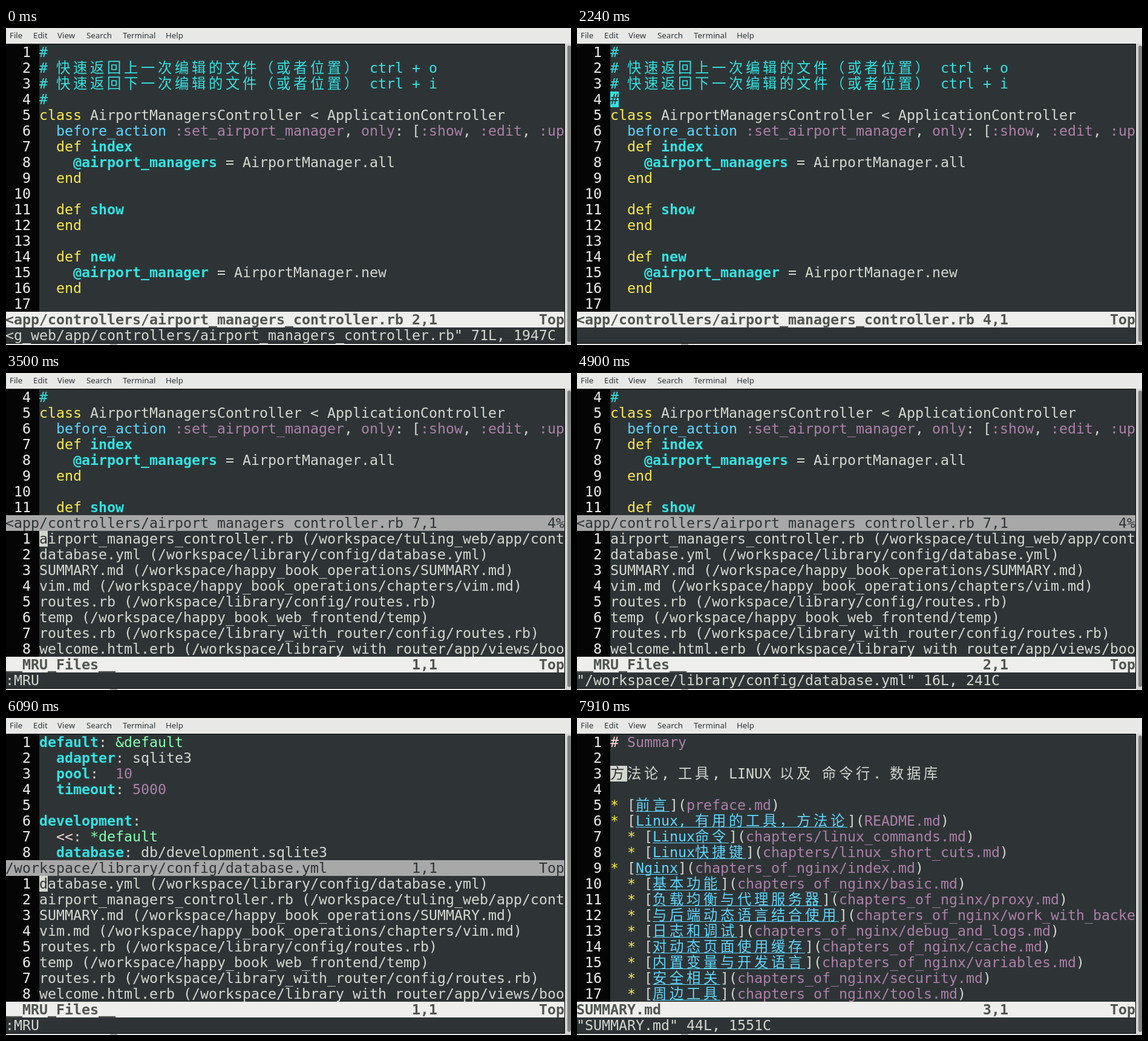
Animation of 934 by 524 pixels, one loop 8000 ms. Source, as an HTML page with a canvas:

```html
<!DOCTYPE html>
<html lang="zh">
<head>
<meta charset="utf-8">
<title>Terminal</title>
<style>
  html, body { margin: 0; width: 100%; height: 100%; overflow: hidden; background: #2e3436; }
  canvas { display: block; }
</style>
</head>
<body>
<canvas id="stage" width="934" height="524"></canvas>
<script>
const ctx = document.getElementById('stage').getContext('2d');
const LOOP = 8000, CELL = 14, ROW = 26, LEFT = -1, TOP = 27, COLS = 66, GUTTER = 4;
const MONO = '23.3px "DejaVu Sans Mono", "Noto Sans CJK SC", "Noto Sans CJK", monospace';
const BG = '#2e3436', FG = '#d3d7cf', NUM = '#eeeeec';

// "~x" switches style: capitals are bold, "u" is underlined
const STYLES = {
  w: { color: FG },
  c: { color: '#34e2e2' },
  C: { color: '#34e2e2', bold: true },
  y: { color: '#fce94f' },
  b: { color: '#5fd7ff' },
  u: { color: '#5fd7ff', line: true },
  p: { color: '#ad7fa8' },
  g: { color: '#87ffaf' },
  k: { color: '#ffd7d7' }
};

const ruby = [
  '~c#',
  '~c# 快速返回上一次编辑的文件（或者位置） ctrl + o',
  '~c# 快速返回下一次编辑的文件（或者位置） ctrl + i',
  '~c#',
  '~yclass ~wAirportManagersController < ApplicationController',
  '  ~bbefore_action ~p:set_airport_manager~w, ~ponly~w: [~p:show~w, ~p:edit~w, ~p:up',
  '  ~ydef ~Cindex',
  '    ~C@airport_managers~w = AirportManager.all',
  '  ~yend',
  '',
  '  ~ydef ~Cshow',
  '  ~yend',
  '',
  '  ~ydef ~Cnew',
  '    ~C@airport_manager~w = AirportManager.new',
  '  ~yend',
  ''
];

const dbEntry = name => [
  `~C${name}~w:`, '  ~k<<~w: ~g*default', `  ~Cdatabase~w: db/${name}.sqlite3`
];
const yaml = [
  '~Cdefault~w: ~g&default',
  '  ~Cadapter~w: sqlite3',
  '  ~Cpool~w:  ~p10',
  '  ~Ctimeout~w: ~p5000',
  '', ...dbEntry('development'),
  '', ...dbEntry('test'),
  '', ...dbEntry('production')
];

const link = (label, url) => `~y* ~w[~u${label}~w](~p${url}.md~w)`;
const sub = (label, url) => '  ' + link(label, url);
const nginx = (label, page) => sub(label, 'chapters_of_nginx/' + page);
const summary = [
  '~k# ~pSummary',
  '',
  '方法论, 工具, LINUX 以及 命令行. 数据库',
  '',
  link('前言', 'preface'),
  link('Linux, 有用的工具，方法论', 'README'),
  sub('Linux命令', 'chapters/linux_commands'),
  sub('Linux快捷键', 'chapters/linux_short_cuts'),
  link('Nginx', 'chapters_of_nginx/index'),
  nginx('基本功能', 'basic'),
  nginx('负载均衡与代理服务器', 'proxy'),
  nginx('与后端动态语言结合使用', 'work_with_backend'),
  nginx('日志和调试', 'debug_and_logs'),
  nginx('对动态页面使用缓存', 'cache'),
  nginx('内置变量与开发语言', 'variables'),
  nginx('安全相关', 'security'),
  nginx('周边工具', 'tools')
];

const controller = 'airport_managers_controller.rb (/workspace/tuling_web/app/controllers/airport_managers_controller.rb)';
const database = 'database.yml (/workspace/library/config/database.yml)';
const recent = (...latest) => [
  ...latest,
  'SUMMARY.md (/workspace/happy_book_operations/SUMMARY.md)',
  'vim.md (/workspace/happy_book_operations/chapters/vim.md)',
  'routes.rb (/workspace/library/config/routes.rb)',
  'temp (/workspace/happy_book_web_frontend/temp)',
  'routes.rb (/workspace/library_with_router/config/routes.rb)',
  'welcome.html.erb (/workspace/library_with_router/app/views/books/welcome.html.erb)'
];

const pane = (lines, name, end, rows = 17, first = 1, pos) => ({ lines, name, end, rows, first, pos });
const rubyName = '<app/controllers/airport_managers_controller.rb';
const yamlName = '/workspace/library/config/database.yml';
const mru = (...latest) => pane(recent(...latest), '__MRU_Files__', 'Top', 8);

const screens = {
  ruby: [pane(ruby, rubyName, 'Top')],
  rubySplit: [pane(ruby, rubyName, '4%', 8, 4, '7,1'), mru(controller, database)],
  yaml: [pane(yaml, yamlName, 'All')],
  yamlSplit: [pane(yaml, yamlName, 'Top', 8, 1, '1,1'), mru(database, controller)],
  summary: [pane(summary, 'SUMMARY.md', 'Top')]
};

// Each step changes part of the state; "line" is the cursor line of the last pane
const steps = [
  { t: 0, screen: 'ruby', line: 2, blink: false, visual: 0,
    cmd: '<g_web/app/controllers/airport_managers_controller.rb" 71L, 1947C' },
  { t: 350, blink: true },
  { t: 490, visual: 2, cmd: '-- VISUAL LINE --' },
  { t: 1260, blink: false },
  { t: 1610, line: 3, blink: true },
  { t: 2240, line: 4, visual: 0, cmd: '' },
  { t: 2380, line: 5 },
  { t: 2590, line: 6 },
  { t: 2800, line: 7 },
  { t: 3430, blink: false, cmd: ':MRU' },
  { t: 3500, screen: 'rubySplit', line: 1, blink: true },
  { t: 4270, blink: false },
  { t: 4480, line: 2, blink: true },
  { t: 4900, blink: false, cmd: `"${yamlName}" 16L, 241C` },
  { t: 5040, screen: 'yaml', line: 1, blink: true },
  { t: 5810, blink: false },
  { t: 5950, blink: true },
  { t: 6090, screen: 'yamlSplit', cmd: ':MRU' },
  { t: 6510, line: 2 },
  { t: 6720, line: 3 },
  { t: 7350, blink: false, cmd: '"SUMMARY.md" 44L, 1551C' },
  { t: 7420, screen: 'summary', line: 1, blink: true },
  { t: 7700, line: 2 },
  { t: 7910, line: 3 }
];

const rect = (color, x, y, w, h) => { ctx.fillStyle = color; ctx.fillRect(x, y, w, h); };
const colX = col => LEFT + col * CELL;
const rowY = row => TOP + row * ROW;
const cells = ch => /[\u2e80-\uffef]/.test(ch) ? 2 : 1;

// Splits marked-up text into placed, styled characters
function layout(text, col) {
  let style = STYLES.w;
  const out = [];
  for (let i = 0; i < text.length; i++) {
    if (text[i] === '~') { style = STYLES[text[++i]]; continue; }
    const width = cells(text[i]);
    if (col + width > COLS) break;
    out.push({ ch: text[i], col, width, style });
    col += width;
  }
  return out;
}

function glyph(ch, col, row, color, bold) {
  ctx.font = (bold ? 'bold ' : '') + MONO;
  ctx.fillStyle = color;
  ctx.fillText(ch, colX(col), rowY(row) + 21);
}

function plain(text, col, row, color, bold) {
  for (const c of layout(text, col)) glyph(c.ch, c.col, row, color, bold);
}

function codeRow(row, number, text, cursor, selected) {
  const y = rowY(row), chars = layout(text, GUTTER);
  rect('#050505', 0, y, 55, ROW);
  plain(String(number).padStart(3), 0, row, NUM);
  if (selected) {
    const last = chars[chars.length - 1];
    rect('#626262', 55, y, (last.col + last.width + 1 - GUTTER) * CELL, ROW);
  }
  if (cursor) {
    const c = chars[0];
    const color = c && c.ch !== ' ' ? c.style.color : FG;
    rect(color, 55, y, CELL * (c ? c.width : 1), ROW);
  }
  chars.forEach((c, i) => {
    const color = cursor && i === 0 ? BG : c.style.color;
    if (c.style.line) rect(color, colX(c.col), y + 23, c.width * CELL, 1);
    glyph(c.ch, c.col, row, color, c.style.bold);
  });
}

function statusRow(row, p, pos, active) {
  const color = active ? '#50544f' : BG;
  rect(active ? '#eeeeec' : '#a8a8a8', 0, rowY(row), 923, ROW);
  plain(p.name, 0, row, color, active);
  plain(pos, 48, row, color, active);
  plain(p.end, COLS - p.end.length, row, color, active);
}

function frame() {
  rect('#e8e8e7', 0, 0, 934, 524);
  ctx.font = '13.3px "Noto Sans", "Open Sans", sans-serif';
  ctx.fillStyle = '#2e3436';
  [['File', 6], ['Edit', 45], ['View', 85], ['Search', 133], ['Terminal', 193], ['Help', 264]]
    .forEach(([label, x]) => ctx.fillText(label, x, 17));
  rect('#000', 0, 26, 924, 496);
  rect(BG, 0, 27, 923, 494);
  rect('#d6d7d5', 924, 26, 10, 498);
  ctx.fillStyle = '#7e8281';
  ctx.beginPath();
  ctx.roundRect(928, 29, 6, 490, 3);
  ctx.fill();
  rect('#a9abaa', 172, 522, 12, 2);
}

function draw(s) {
  frame();
  const panes = screens[s.screen];
  let row = 0;
  panes.forEach((p, n) => {
    const active = n === panes.length - 1;
    rect(BG, 0, rowY(row), 923, ROW);
    for (let i = 0; i < p.rows; i++, row++) {
      const line = p.first + i;
      if (line > p.lines.length) {
        plain('\u007e'.replace('~', '~w'), 0, row, FG);
        glyph('~', 0, row, '#555753');
        continue;
      }
      const cursor = active && s.blink && line === s.line;
      const selected = s.visual && line >= s.visual && line <= s.line;
      codeRow(row, line, p.lines[line - 1], cursor, selected);
    }
    const here = s.line + (p.lines[s.line - 1] ? ',1' : ',0-1');
    statusRow(row++, p, active ? here : p.pos, active);
  });
  plain(s.cmd, 0, row, FG, s.cmd.startsWith('--'));
}

function tick() {
  const t = performance.now() % LOOP;
  draw(Object.assign({}, ...steps.filter(s => s.t <= t)));
  requestAnimationFrame(tick);
}
tick();
</script>
</body>
</html>
```
